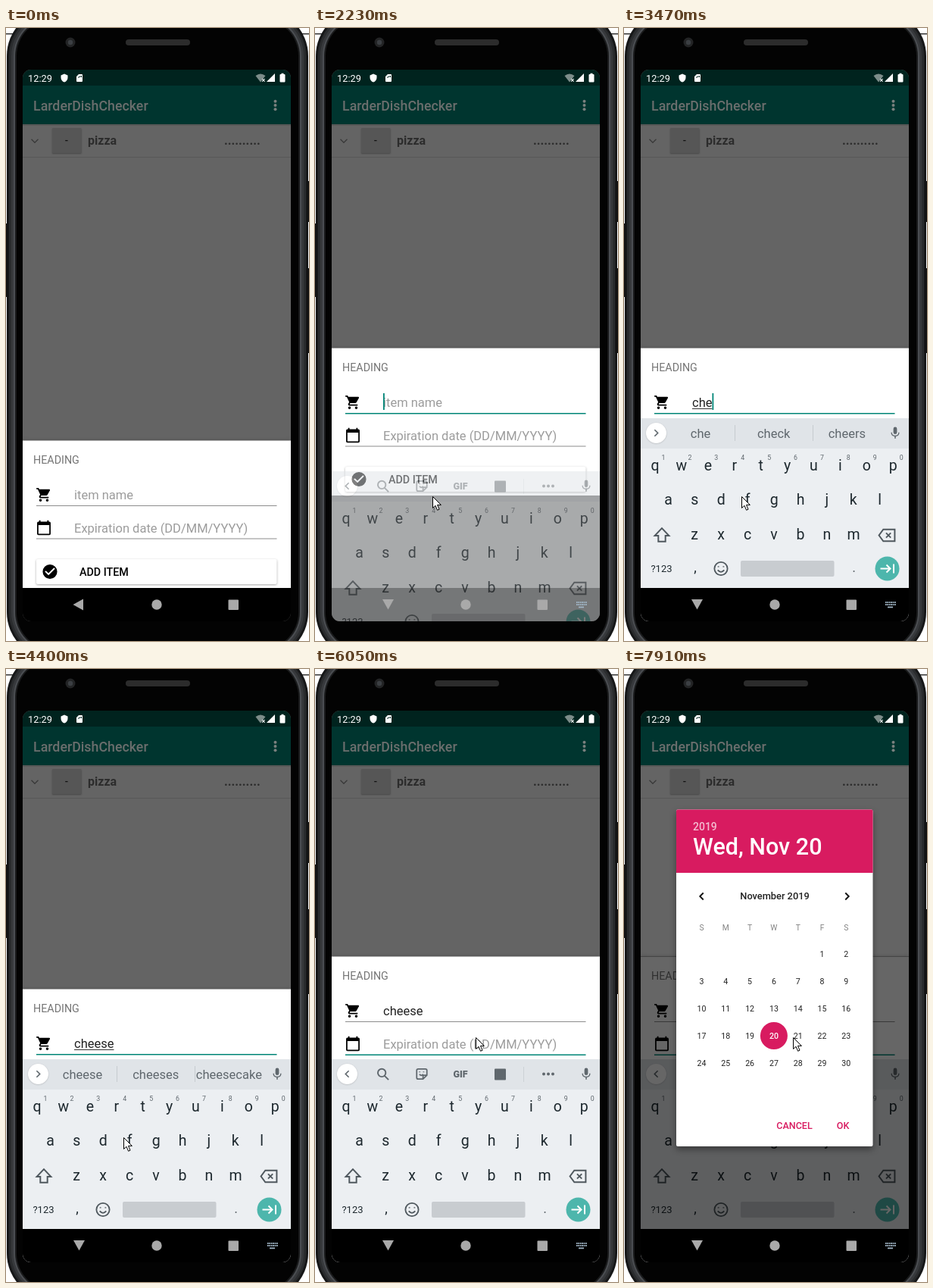
An HTML page with a canvas that plays this animation: 400 by 809 pixels, repeating every 7.99 s.

```html
<!DOCTYPE html>
<html lang="en">
<head>
<meta charset="utf-8">
<title>Add an item</title>
<style>
html, body { margin: 0; width: 100%; height: 100%; overflow: hidden; background: #fff; }
canvas { display: block; width: 400px; height: 809px; }
</style>
</head>
<body>
<canvas id="stage"></canvas>
<script>
const W = 400, H = 809, LOOP = 7990;
const TEAL = '#008577', PINK = '#d81b60', GREY = '#5f676d', INK = '#1d282e';
const dpr = window.devicePixelRatio || 1;

function context(canvas) {
  canvas.width = W * dpr;
  canvas.height = H * dpr;
  return canvas.getContext('2d');
}
const layer = context(document.createElement('canvas'));
let c = context(document.getElementById('stage'));

// Icons on a 24 unit grid
const ICON = {
  cart: 'M7 18a2 2 0 1 0 0 4 2 2 0 0 0 0-4zM1 2v2h2l3.6 7.6-1.35 2.4A2 2 0 0 0 7 17h12v-2H7.4l-.2-.4.9-1.6h7.45c.75 0 1.4-.4 1.75-1l3.6-6.5A1 1 0 0 0 20 4H5.2l-.95-2zM17 18a2 2 0 1 0 0 4 2 2 0 0 0 0-4z',
  calendar: 'M20 3h-1V1h-2v2H7V1H5v2H4a2 2 0 0 0-2 2v16a2 2 0 0 0 2 2h16a2 2 0 0 0 2-2V5a2 2 0 0 0-2-2zm0 18H4V8h16z',
  check: 'M12 2a10 10 0 1 0 0 20 10 10 0 0 0 0-20zM10 17l-5-5 1.4-1.4 3.6 3.6 7.6-7.6L19 8z',
  mic: 'M12 14a3 3 0 0 0 3-3V5a3 3 0 0 0-6 0v6a3 3 0 0 0 3 3zm5.3-3a5.3 5.1 0 0 1-10.6 0H5a7 7 0 0 0 6 6.7V21h2v-3.3a7 7 0 0 0 6-6.7z',
  search: 'M14.5 14.5l6 6M16 9.5a6.2 6.2 0 1 1-12.4 0 6.2 6.2 0 0 1 12.4 0z',
  sticker: 'M6 3.5h12A2.5 2.5 0 0 1 20.5 6v8L14 20.5H6A2.5 2.5 0 0 1 3.5 18V6A2.5 2.5 0 0 1 6 3.5zM14 20v-4a2 2 0 0 1 2-2h4M8 12.5q3.5 3.5 6.5 0M8.5 8v1M15 8v1',
  shift: 'M12 3L3 12.5h4.5V20h9v-7.5H21z',
  erase: 'M7.5 4.5H22v15H7.5L2 12zM11 9l6 6M17 9l-6 6',
  enter: 'M3 12h13M11 7l5 5-5 5M20.5 6v12',
  smile: 'M21 12a9 9 0 1 1-18 0 9 9 0 0 1 18 0zM8.5 8.5v1.5M15.5 8.5v1.5M7.5 14q4.5 5 9 0',
  shield: 'M12 1L3 5v6c0 5.5 3.8 10.7 9 12 5.2-1.3 9-6.5 9-12V5z',
  card: 'M18 2h-8L4 8v12a2 2 0 0 0 2 2h12a2 2 0 0 0 2-2V4a2 2 0 0 0-2-2zM9 8h2v4H9zM12.5 6h2v4h-2zM16 6h2v4h-2z',
  left: 'M15 6l-6 6 6 6',
  right: 'M9 6l6 6-6 6',
  down: 'M6 9l6 6 6-6',
  back: 'M2 12L20 2v20z'
};
for (const k in ICON) ICON[k] = new Path2D(ICON[k]);
const POINTER = new Path2D('M.5.5V15.5L4 12.3 6.6 18.3 9 17.2 6.5 11.4H11.4z');

function icon(name, x, y, size, color, line, turn = 0) {
  c.save();
  c.translate(x, y);
  c.rotate(turn);
  c.scale(size / 24, size / 24);
  c.translate(-12, -12);
  if (line) {
    c.strokeStyle = color;
    c.lineWidth = line;
    c.stroke(ICON[name]);
  } else {
    c.fillStyle = color;
    c.fill(ICON[name], 'evenodd');
  }
  c.restore();
}

function rect(x, y, w, h, color, r = 0) {
  c.fillStyle = color;
  c.beginPath();
  c.roundRect(x, y, w, h, r);
  c.fill();
}

function dot(x, y, r, color) {
  c.fillStyle = color;
  c.beginPath();
  c.arc(x, y, r, 0, 7);
  c.fill();
}

function text(s, x, y, size, color, weight = 400, align = 'left') {
  c.font = `${weight} ${size}px Roboto, sans-serif`;
  c.fillStyle = color;
  c.textAlign = align;
  c.fillText(s, x, y);
}
const mid = (s, x, y, size, color, weight) => text(s, x, y, size, color, weight, 'center');

function shadow(blur, dy, alpha, paint) {
  c.save();
  c.shadowColor = `rgba(0,0,0,${alpha})`;
  c.shadowBlur = blur * dpr;
  c.shadowOffsetY = dy * dpr;
  paint();
  c.restore();
}

// Paint a group as one translucent layer, moved down by dy
function fade(alpha, dy, paint) {
  if (!alpha) return;
  const main = c;
  c = layer;
  c.setTransform(dpr, 0, 0, dpr, 0, 0);
  c.clearRect(0, 0, W, H);
  c.translate(0, dy);
  paint();
  c = main;
  c.globalAlpha = alpha;
  c.drawImage(layer.canvas, 0, 0, W, H);
  c.globalAlpha = 1;
}

// Latest row whose time has passed
function at(rows, t) {
  let hit = rows[0];
  for (const row of rows) if (t >= row[0]) hit = row;
  return hit;
}

const SHIFT = [[0, 0], [2150, -60], [2190, -122], [4550, -137], [4630, -155], [4720, -165]];
const BOARD = [[0, 224, 0], [2150, 150, 0.12], [2190, 105, 0.3], [2230, 70, 0.5], [2310, 20, 0.85], [2380, 0, 1]];
const TYPED = [
  [0, ''],
  [3300, 'c', 'c', 'can', 'could'],
  [3380, 'ch', 'ch', 'check', 'Christmas'],
  [3470, 'che', 'che', 'check', 'cheers'],
  [3710, 'chee', 'chee', 'cheese', 'cheers'],
  [3790, 'chees', 'chees', 'cheese', 'cheesy'],
  [3860, 'cheese', 'cheese', 'cheesy', 'cheers'],
  [3940, 'cheese', 'cheese', 'cheeses', 'cheesecake']
];
const CARET = [[0, 0], [1530, 1], [2690, 0], [3150, 1], [4400, 0], [4550, 1], [5060, 0], [5560, 1], [5970, 0], [6940, 1]];
const TURN = [[0, 0], [1530, 0.12], [1620, 0.45], [1710, 0.8], [1870, 1]];
const DIALOG = [[0, 0, 0], [6940, 0.12, 0.35], [6970, 0.4, 0.6], [7040, 0.78, 0.6], [7130, 1, 0.6]];
// start, end, steps, from x, from y, to x, to y
const MOVES = [
  [510, 1130, 9, 285, 749, 155, 618],
  [4860, 5570, 10, 155, 618, 240, 484],
  [5880, 5970, 2, 240, 484, 226, 471],
  [5970, 6050, 2, 226, 471, 212, 486],
  [7910, 7911, 2, 212, 486, 223, 486]
];

function phone() {
  rect(0, 0, W, H, '#fff');
  rect(0, 7, W, 1.5, '#333');
  const body = (x, color) => rect(x, x - 26, W - 2 * x, 860 - 2 * x, color, 63 - x);
  body(1, '#161718');
  body(4, '#2a2c2e');
  body(7, '#37393c');
  body(10, '#4b4e52');
  body(12, '#1a1b1c');
  body(14, '#030303');
  rect(0, 258, 2, 97, '#111');
  rect(398, 202, 2, 54, '#111');
  rect(397.5, 317, 2.5, 112, '#111');
  rect(158, 15, 85, 8, '#2c2c2c', 4);
  dot(85, 19, 6.5, '#232425');
  dot(85, 19, 3.2, '#3b3f43');
}

function appScreen() {
  rect(22, 55, 354, 728, '#646464');
  rect(22, 55, 354, 21, '#00231e');
  rect(22, 76, 354, 51, '#00352f');
  rect(22, 127, 354, 2, 'rgba(0,0,0,.12)');
  text('12:29', 29, 70.5, 12.8, '#fff');
  icon('shield', 77, 66, 12, '#fff');
  icon('card', 97, 66, 12, '#fff');
  c.fillStyle = '#7c8c89';
  c.beginPath();
  c.moveTo(336, 71.5);
  c.lineTo(329.5, 63);
  c.quadraticCurveTo(336, 58, 342.5, 63);
  c.fill();
  mid('×', 340, 72, 9, '#fff', 700);
  c.fillStyle = '#fff';
  c.beginPath();
  c.moveTo(344, 71);
  c.lineTo(355, 71);
  c.lineTo(355, 60);
  c.fill();
  rect(361.5, 61, 7, 10.5, '#fff', 1);
  rect(363.5, 59.8, 3, 2, '#fff');

  text('LarderDishChecker', 36, 109, 17.8, '#6a6e6d', 500);
  for (let i = -1; i < 2; i++) dot(355.5, 102 + i * 5.2, 2, '#7a807e');
  icon('down', 38, 149, 18, '#3a3a3a', 1.8);
  shadow(2, 1, 0.3, () => rect(61, 132, 38.5, 33, '#565656', 1));
  mid('-', 80, 153, 13, '#111', 500);
  text('pizza', 108, 153.5, 16, '#2c2c2c', 700);
  text('..........', 288, 153.5, 16.4, '#2c2c2c', 700);
  rect(22, 170, 354, 1, '#585858');
}

function field(y, glyph, value, hint, focused, caret, composing) {
  icon(glyph, 50, y - 6, 21.5, '#000');
  text(value || hint, 90, y, 16.5, value ? '#212121' : '#9c9c9c');
  const w = value ? c.measureText(value).width : 0;
  if (composing && value) rect(90, y + 2, w, 1, '#333');
  rect(40, y + 8, 317.5, focused ? 1.6 : 1, focused ? TEAL : '#8c8c8c');
  if (focused && caret) rect(90 + w, y - 18, 1.8, 22, TEAL);
}

function sheet(t) {
  const focus = t < 1530 ? 0 : t < 4550 ? 1 : 2;
  const caret = at(CARET, t)[1];
  c.save();
  c.beginPath();
  c.rect(22, 127, 354, 612);
  c.clip();
  c.translate(0, at(SHIFT, t)[1]);
  shadow(5, -1, 0.25, () => rect(22, 544.6, 354, 194.4, '#fff'));
  text('HEADING', 36, 575, 14.3, '#757575');
  field(622, 'cart', at(TYPED, t)[1], 'item name', focus === 1, caret, focus === 1);
  field(665.5, 'calendar', '', 'Expiration date (DD/MM/YYYY)', focus === 2, caret);
  shadow(3, 1, 0.35, () => rect(40, 701, 317.5, 33, '#fff', 2));
  icon('check', 58, 717.5, 23, '#000');
  text('ADD ITEM', 97, 722.5, 14.3, '#000', 500);
  c.restore();
}

function strip(t) {
  const tools = t < 3300 || t >= 5060;
  rect(22, 515, 354, 40, '#e0e4e8');
  shadow(2, 0.5, 0.2, () => dot(42.5, 534.5, 13.5, '#fff'));
  icon(tools ? 'left' : 'right', 42.5, 534.5, 17, GREY, 2.4);
  icon('mic', 358, 534.5, 19, GREY);
  if (tools) {
    icon('search', 90, 535, 20, GREY, 2.3);
    icon('sticker', 141, 534.5, 19, GREY, 2.2);
    mid('GIF', 192, 539, 12.5, GREY, 900);
    rect(237, 527.5, 15, 15, GREY, 1);
    rect(275, 525, 1, 20, '#ccd1d5');
    for (let i = -1; i < 2; i++) dot(308 + i * 6, 534.5, 2, GREY);
  } else if (t < 4860) {
    at(TYPED, t).slice(2).forEach((word, i) => mid(word, 101 + i * 96.7, 540.5, 16.5, GREY));
    rect(146, 524, 1, 21, '#c6cbcf');
    rect(249, 524, 1, 21, '#c6cbcf');
  }
}

function keyboard(t) {
  rect(22, 555, 354, 240, '#eceff2');
  strip(t);
  [...'qwertyuiop'].forEach((k, i) => {
    const x = 41 + i * 34.9;
    mid(k, x, 583.5, 19.5, INK);
    mid((i + 1) % 10, x + 11, 570, 8.8, GREY);
  });
  [...'asdfghjkl'].forEach((k, i) => mid(k, 58.5 + i * 34.9, 629, 19.5, INK));
  [...'zxcvbnm'].forEach((k, i) => mid(k, 93 + i * 35, 675, 19.5, INK));
  icon('shift', 50, 669.5, 25, '#4f585e', 1.9);
  icon('erase', 347, 669.5, 25, '#4f585e', 1.9);
  mid('?123', 49.5, 718, 13, INK);
  mid(',', 94, 718, 18, INK);
  icon('smile', 128, 713.5, 23, '#4f585e', 1.9);
  rect(154, 703, 123.5, 21, '#c8ccd0', 2);
  mid('.', 303.5, 718, 18, GREY);
  dot(347.5, 713.5, 16, '#4db6ac');
  icon('enter', 347.5, 713.5, 24, '#fff', 2);
}

function navBar(t, alpha) {
  const color = '#a9a9a9';
  rect(22, 739, 354, 44, `rgba(0,0,0,${alpha})`);
  const turn = at(TURN, t)[1];
  icon('back', 96 + turn * 0.5, 761 - turn, 18, color, 0, -turn * Math.PI / 2);
  dot(199, 761, 6.7, color);
  rect(293.5, 754.5, 13.5, 13.5, color, 1);
  if (t < 1530) return;
  c.globalAlpha = Math.min(1, 0.4 + (t - 1530) / 300);
  for (let row = 0; row < 2; row++)
    for (let i = 0; i < 6; i++) rect(345 + i * 2.4, 757 + row * 3, 1.7, 2, '#9fb4c4');
  rect(348, 763.5, 7, 1.7, '#9fb4c4');
  c.globalAlpha = 1;
}

function dialog() {
  shadow(9, 4, 0.4, () => rect(69, 185.5, 259.5, 444.5, '#fff', 2));
  rect(69, 185.5, 259.5, 83.5, PINK, [2, 2, 0, 0]);
  text('2019', 91, 213, 14, 'rgba(255,255,255,.7)', 500);
  text('Wed, Nov 20', 91, 245, 30.5, '#fff', 500);
  icon('left', 102.5, 300, 18, '#111', 2.5);
  icon('right', 294.5, 300, 18, '#111', 2.5);
  mid('November 2019', 199, 304.3, 12.8, '#222', 500);
  const colX = i => 102.5 + i * 31.8;
  [...'SMTWTFS'].forEach((d, i) => mid(d, colX(i), 345, 10.3, '#838383'));
  for (let day = 1; day <= 30; day++) {
    const cell = day + 4, x = colX(cell % 7), y = 376 + Math.floor(cell / 7) * 36;
    const picked = day === 20;
    if (picked) dot(x, y, 18, PINK);
    mid(day, x, y + 3.8, 10.6, picked ? '#fff' : '#222', picked ? 500 : 400);
  }
  mid('CANCEL', 225, 607, 12.5, PINK, 500);
  mid('OK', 289, 607, 12.5, PINK, 500);
}

function pointer(t) {
  const [start, end, n, x0, y0, x1, y1] = at(MOVES, t);
  if (t < start) return;
  const p = Math.min(1, Math.floor((t - start) / (end - start) * (n - 1)) / (n - 1));
  c.save();
  c.translate(Math.round(x0 + (x1 - x0) * p), Math.round(y0 + (y1 - y0) * p));
  c.fillStyle = '#fff';
  c.fill(POINTER);
  c.strokeStyle = '#000';
  c.lineWidth = 1;
  c.stroke(POINTER);
  c.restore();
}

function draw(now) {
  const t = now % LOOP;
  const [, drop, solid] = at(BOARD, t);
  const [, shown, dim] = at(DIALOG, t);
  c.setTransform(dpr, 0, 0, dpr, 0, 0);
  phone();
  c.save();
  c.beginPath();
  c.roundRect(22, 55, 354, 728, 11);
  c.clip();
  appScreen();
  sheet(t);
  fade(solid, drop, () => keyboard(t));
  navBar(t, solid > 0 && solid < 1 ? 0.3 : 1);
  rect(22, 379, 354, 360, `rgba(0,0,0,${dim})`);
  fade(shown, 0, dialog);
  c.restore();
  pointer(t);
}

function tick() {
  draw(performance.now());
  requestAnimationFrame(tick);
}
tick();
</script>
</body>
</html>
```
